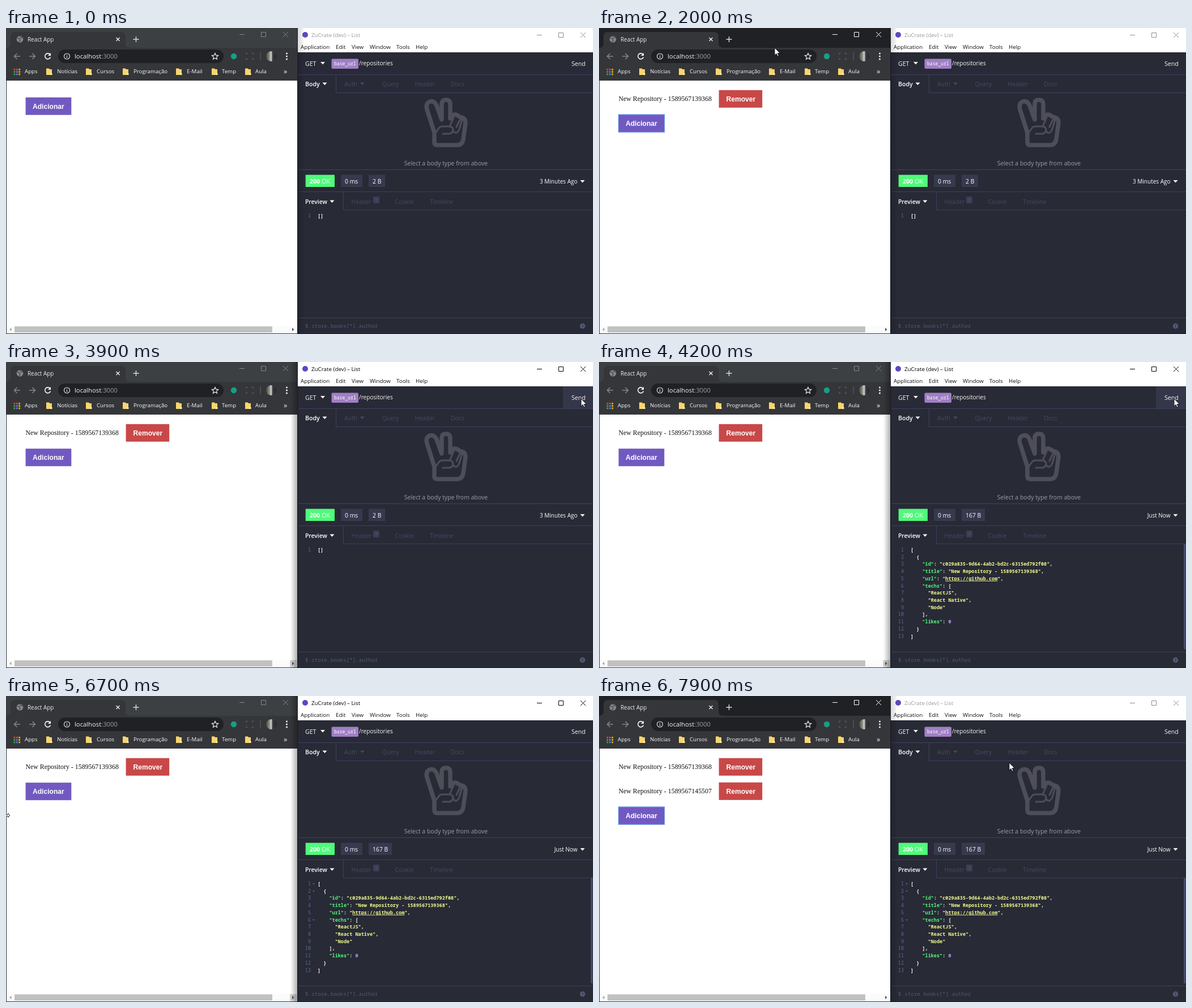
These frames come from a looping animation (1036x541 px, 8000 ms). An HTML page:

```html
<!DOCTYPE html>
<html lang="pt">
<head>
<meta charset="utf-8">
<title>Repositories</title>
<style>
html, body { margin: 0; width: 100%; height: 100%; overflow: hidden; background: #202124; }
svg { display: block; width: 1036px; height: 541px; }
text { white-space: pre; font-family: "Open Sans", "Noto Sans", sans-serif; }
.mono { font-family: "Noto Sans Mono", "DejaVu Sans Mono", monospace; }
.serif { font-family: "Liberation Serif", serif; font-size: 11.87px; fill: #111; }
.btn { font-family: "Liberation Sans", sans-serif; font-size: 12.1px; font-weight: 700; fill: #fff; }
</style>
</head>
<body>
<svg id="stage" viewBox="0 0 1036 541" xmlns="http://www.w3.org/2000/svg"></svg>
<script>
const LOOP = 8000;
const PANEL = '#282a36', EDGE = '#3c4160', FAINT = '#454a66', CHIP = '#373a4e';
const GREEN = '#50fa7b', YELLOW = '#f1fa8c', PURPLE = '#bd93f9', PALE = '#f8f8f2';

const rect = (x, y, w, h, fill, extra = '') =>
  `<rect x="${x}" y="${y}" width="${w}" height="${h}" fill="${fill}" ${extra}/>`;
const text = (x, y, size, fill, str, extra = '') =>
  `<text x="${x}" y="${y}" font-size="${size}" fill="${fill}" ${extra}>${str}</text>`;
const line = (d, color, width = 1, extra = '') =>
  `<path d="${d}" fill="none" stroke="${color}" stroke-width="${width}" ${extra}/>`;
const disc = (x, y, r, fill, extra = '') =>
  `<circle cx="${x}" cy="${y}" r="${r}" fill="${fill}" ${extra}/>`;
const caret = (x, y, fill) => `<path d="M${x - 4} ${y - 2}h8l-4 4.5z" fill="${fill}"/>`;
const group = (id, body) => `<g id="${id}">${body}</g>`;

// Minimise, maximise and close, starting at x
const controls = (x, y) =>
  `<path d="M${x} ${y + .5}h9M${x + 38.5} ${y - 3.5}h8v8h-8zM${x + 77} ${y - 4}l9 9m0 -9l-9 9" fill="none" stroke="currentColor"/>`;

function bookmarks() {
  const names = [[71, 'Notícias'], [141, 'Cursos'], [206, 'Programação'],
    [300, 'E-Mail'], [363, 'Temp'], [422, 'Aula']];
  const hues = ['#ea4335', '#ea4335', '#f9ab00', '#34a853', '#4285f4', '#f9ab00', '#34a853', '#4285f4', '#f9ab00'];
  let out = hues.map((c, i) => rect(13.5 + i % 3 * 4.4, 72 + (i / 3 | 0) * 4.2, 2.8, 2.8, c)).join('');
  out += text(33, 80.2, 9.7, '#f8f9fa', 'Apps');
  for (const [x, name] of names) {
    out += `<path d="M${x} 71.5h5l1 1.5h4v10h-10z" fill="#f8d66d"/>` + rect(x + 7.5, 80, 3, 3, '#fff0b5');
    out += text(x + (x > 350 ? 18 : 19), 80.2, 9.7, '#f8f9fa', name);
  }
  return out + text(490, 81, 13, '#f1f3f4', '»');
}

function browser() {
  const stroke = '#e8eaed', dim = '#85888b';
  return `<rect id="frame" width="514" height="36"/>` +
    rect(0, 35, 514, 58, '#35363a') +
    '<path d="M0 35Q8 35 8 27V15Q8 7 16 7H203Q211 7 211 15V27Q211 35 219 35Z" fill="#35363a"/>' +
    disc(24.5, 20, 5.8, '#85898d') +
    line('M20 18l4 1 1 3 -2 3M25 15l1 2 3 1', '#4a4c50', 1.5) +
    text(38, 24, 9.9, '#e8eaed', 'React App') +
    line('M194.500 17l6 6m0 -6l-6 6', '#f1f3f4', 1.3) +
    line('M224.500 20h10m-5 -5v10', '#dadce0', 1.4) +
    `<g id="leftCtl">${controls(412, 11)}</g>` +
    line('M25 50H14.500m5 -5l-5 5 5 5M41 50h10.500m-5 -5l5 5 -5 5', dim, 1.5) +
    line('M77.500 46.500A5 5 0 1 0 78.500 51.500', '#fff', 1.6) +
    '<path d="M79 44v5h-5z" fill="#fff"/>' +
    rect(92, 38, 292, 24, '#202124', 'rx="12"') +
    disc(107.5, 50, 5, 'none', 'stroke="#dadce0" stroke-width="1.200"') +
    line('M107.500 49.500v3.500m0 -6v1.300', '#dadce0', 1.3) +
    text(121, 53.8, 11.25, '#f1f3f4', 'localhost<tspan fill="#9aa0a6">:3000</tspan>') +
    line('M369 44.500l1.600 3.700 4 .4 -3 2.700 .9 4 -3.500 -2.100 -3.500 2.100 .9 -4 -3 -2.700 4 -.4z', stroke, 1.2) +
    disc(402, 50, 5.2, '#14a085') +
    line('M424 47v-2.500h2.500m7 0h2.500v2.500m0 6v2.500h-2.500m-7 0h-2.500v-2.500', '#5f6266', 1.1) +
    line('M449 43v14', '#5f6368') +
    disc(468, 50, 9, 'url(#photo)') +
    [45, 50, 55].map(y => disc(495.5, y, 1.5, '#f1f3f4')).join('') +
    bookmarks();
}

const repoRow = (id, y, stamp) => group(id,
  `<text class="serif" x="34.500" y="${y + 18.600}">New Repository - ${stamp}</text>` +
  rect(211.6, y - .2, 76.6, 31, '#c84848') +
  `<text class="btn" x="224.500" y="${y + 19.500}">Remover</text>`);

function page() {
  return rect(1, 93, 513, 447, '#fff') +
    repoRow('row1', 110, '1589567139368') + repoRow('row2', 153, '1589567145507') +
    group('add', rect(34.6, -.3, 80.7, 31, '#7159c1') +
      rect(34.5, -.5, 81, 31, 'none', 'id="ring" stroke="#5c8fe6" stroke-width="1.200"') +
      '<text class="btn" x="47" y="19.500">Adicionar</text>') +
    rect(1, 527, 513, 12.5, '#fbfbfb') + rect(15, 527.5, 455, 11, '#c1c1c1') +
    rect(501, 527, 12, 12.5, '#d2d2d2', 'id="scrollHot"') +
    '<path d="M9.500 530v6l-3.500 -3z" fill="#a3a3a3"/><path d="M505 530v6l3.500 -3z" fill="#505050"/>' +
    rect(0, 93, 1, 448, '#303134') + rect(0, 540, 514, 1, '#303134');
}

function peaceHand() {
  const tone = '#4d4e58';
  return line('M756 202V185L743 144Q740 133 748 130Q756 128 760 137L769 162V135Q769 127 776.500 127Q784 127 784 135V160' +
      'L787 156Q792 150 799 156L803 158Q811 159 811 168L807 197Q805 207 796 207H762Q756 207 756 202Z', tone, 7.5, 'stroke-linejoin="round"') +
    line('M757 187L764 177Q766 174 770 174H783Q789 175 789 180Q788 187 782 187H771M784 172L790 158' +
      'M789 182Q795 190 800 179L805 162M795 175L803 158', tone, 3, 'stroke-linecap="round"');
}

function jsonView() {
  const rows = ['[', '  {', '    "id": "c029a835-9d64-4ab2-bd2c-6315ed792f08",',
    '    "title": "New Repository - 1589567139368",', '    "url": "https://github.com",',
    '    "techs": [', '      "ReactJS",', '      "React Native",', '      "Node"',
    '    ],', '    "likes": 0', '  }', ']'];
  const span = (fill, str, extra = '') => `<tspan fill="${fill}" ${extra}>${str}</tspan>`;
  const paint = str => str.replace(/"([^"]*)"(:?)|\b0\b/g, (all, body, colon) => {
    if (body === undefined) return span(PURPLE, all);
    if (colon) return span(GREEN, `"${body}"`) + ':';
    if (body.startsWith('http')) return span(YELLOW, '"' + span(YELLOW, body, 'text-decoration="underline"') + '"');
    return span(YELLOW, `"${body}"`);
  });
  return rows.map((str, i) => {
    const y = 335 + i * 12.71;
    return text(538, y, 8.5, '#5b6994', i + 1, 'class="mono" text-anchor="end"') +
      text(550, y, 8.53, PALE, paint(str), 'class="mono" font-weight="600"');
  }).join('') + rect(1032, 322, 3.5, 186, '#434d6c');
}

function client() {
  const tabs = (y, items) => items.map(([x, s]) => text(x, y, 10.4, FAINT, s)).join('');
  const menu = [[520, 'Application'], [582, 'Edit'], [610, 'View'], [642, 'Window'], [689, 'Tools'], [723, 'Help']];
  const folds = [332, 345, 396].map(y => `<path d="M541 ${y - 1}h4l-2 2.500z" fill="#5b6385"/>`).join('');
  return rect(514, 0, 522, 541, '#1f212b') + rect(515, 0, 521, 43, '#fff') +
    disc(528, 12, 5, '#5849be') +
    `<text id="title" x="539" y="16" font-size="9.800">ZuCrate (dev) – List</text>` +
    `<g id="rightCtl">${controls(937, 12)}</g>` +
    menu.map(([x, s]) => text(x, 37, 9.8, '#111', s)).join('') +
    rect(516, 43, 520, 497, PANEL) +
    rect(983, 43, 53, 39, '#34374a', 'id="hover"') +
    line('M516 82.500H1036M582.500 83V114.500H1036M516 250.500H1036M516 289.500H1036M595.500 290V321.500H1036M516 512.500H1036', EDGE) +
    text(528, 66.5, 10.6, PALE, 'GET') + caret(559, 62, PALE) +
    rect(574.5, 54.5, 47.5, 17.5, '#a07fc6', 'rx="2"') +
    text(579, 66, 8.1, '#fff', 'base_url', 'class="mono"') +
    text(623, 66.3, 10.1, PALE, '/repositories') + text(998, 66.8, 10.6, PALE, 'Send') +
    text(528, 102.5, 10.6, '#fff', 'Body', 'font-weight="600"') + caret(562.5, 98.5, '#fff') +
    tabs(102.5, [[597, 'Auth'], [663.5, 'Query'], [721.5, 'Header'], [785, 'Docs']]) + caret(629, 98.5, FAINT) +
    peaceHand() +
    text(776.5, 243, 10.5, '#9d9ea5', 'Select a body type from above', 'text-anchor="middle"') +
    rect(528.7, 259.6, 51.3, 21.4, GREEN) +
    text(536, 275, 10.6, '#fff', '<tspan font-weight="700">200</tspan> OK') +
    rect(591, 259.6, 38, 21.4, CHIP) + text(598, 275, 10.4, '#fff', '0 ms') +
    `<rect id="sizeChip" x="640" y="259.600" height="21.400" fill="${CHIP}"/>` +
    `<text id="size" x="647" y="275" font-size="10.400" fill="#fff"></text>` +
    `<text id="age" x="1008.500" y="274.500" font-size="10" fill="#fff" text-anchor="end"></text>` + caret(1017.5, 271, PALE) +
    text(528, 310.5, 10.3, '#fff', 'Preview', 'font-weight="600"') + caret(575.5, 306.5, '#fff') +
    tabs(310.5, [[609.5, 'Header'], [686.5, 'Cookie'], [748, 'Timeline']]) +
    rect(648, 298, 11, 12, '#3b3e55', 'rx="2"') + text(651.5, 306.5, 7.5, '#5a607f', '7') +
    group('empty', text(538, 335, 8.5, '#5b6994', '1', 'class="mono" text-anchor="end"') +
      text(550, 335, 8.53, PALE, '[]', 'class="mono" font-weight="600"')) +
    group('json', jsonView()) + group('folds', folds) +
    text(528, 530, 9.3, '#525977', '$.store.books[*].author', 'class="mono"') +
    disc(1017.5, 527, 4.7, '#555a75') + text(1017.5, 530, 7.5, PANEL, '?', 'text-anchor="middle" font-weight="700"');
}

// The window in front darkens the edge of its neighbour
function shadows() {
  return rect(502, 0, 12, 541, 'url(#shadeRight)', 'id="overLeft"') +
    rect(515, 0, 10, 541, 'url(#shadeLeft)', 'id="overRight"');
}

function pointers() {
  const ink = 'fill="#fff" stroke="#111" stroke-width=".9" stroke-linejoin="round"';
  return group('arrow', `<path d="M0 0V13.200L3.100 10.400L5.200 15L7.200 14.100L5.200 9.600H9.400Z" ${ink}/>`) +
    group('hand', `<path d="M-1.500 2Q0 -1.500 1.700 2V7Q3.500 5.500 4.500 7.600Q6.500 6.500 7.200 8.600Q9.600 8 9.300 11V14.500L7.500 19.500H-.5L-4.500 13Q-6 10.500 -4.500 9.700Q-3 9.500 -1.500 12Z" ${ink}/>`) +
    group('ibeam', line('M-2.500 -6.500H2.500M0 -6.500V6.500M-2.500 6.500H2.500', '#f5f5f5', 1.2)) +
    group('resize', `<path d="M-6 0L-2.500 -3.500V-1.300H1.500V-3.500L5 0L1.500 3.500V1.300H-2.500V3.500Z" ${ink}/>`);
}

const fade = (id, stops) => `<linearGradient id="${id}">` +
  stops.map(([at, color, alpha = 1]) => `<stop offset="${at}" stop-color="${color}" stop-opacity="${alpha}"/>`).join('') +
  '</linearGradient>';

const stage = document.getElementById('stage');
stage.innerHTML = '<defs>' +
  fade('photo', [[0, '#3f4a3c'], [.35, '#8f978c'], [.5, '#d5d7d2'], [.65, '#3a3d3c'], [1, '#22262a']]) +
  fade('shadeRight', [[0, '#000', 0], [1, '#000', .3]]) +
  fade('shadeLeft', [[0, '#000', .14], [1, '#000', .04]]) + '</defs>' +
  client() + browser() + page() + shadows() + pointers();

const el = {};
stage.querySelectorAll('[id]').forEach(node => { el[node.id] = node; });
const show = (id, on) => el[id].setAttribute('display', on ? 'inline' : 'none');

// Pointer path: time, x, y, shape
const PATH = [
  [600, 635, 14, 'arrow'], [700, 58, 178, 'arrow'], [800, 101, 143, 'hand'], [900, 101, 143, 'hand'],
  [1000, 101, 142, 'hand'], [1600, 101, 142, 'hand'], [1700, 60, 184, 'arrow'], [1900, 200, 60, 'arrow'],
  [2100, 420, 10, 'arrow'], [2300, 625, 60, 'arrow'], [2500, 607, 118, 'arrow'], [2600, 650, 118, 'arrow'],
  [2800, 760, 75, 'ibeam'], [2900, 809, 60, 'ibeam'], [3200, 985, 60, 'arrow'], [3300, 985, 60, 'arrow'],
  [3400, 1000, 62, 'arrow'], [3700, 1015, 65, 'arrow'], [4600, 1015, 65, 'arrow'], [4700, 1005, 90, 'arrow'],
  [4900, 960, 240, 'ibeam'], [5100, 876, 376, 'ibeam'], [5400, 689, 396, 'ibeam'], [5600, 689, 396, 'ibeam'],
  [5700, 685, 402, 'ibeam'], [5900, 676, 417, 'ibeam'], [6300, 676, 417, 'ibeam'], [6400, 600, 414, 'ibeam'],
  [6500, 380, 360, 'arrow'], [6700, 2, 211, 'resize'], [6800, 20, 90, 'arrow'], [6900, 60, 11, 'arrow'],
  [7000, 110, 90, 'arrow'], [7200, 99, 165, 'hand'], [7600, 99, 165, 'hand'], [7700, 99, 203, 'hand'],
  [7800, 420, 150, 'arrow'], [7900, 724, 118, 'arrow']
];

function pointerAt(t) {
  const i = PATH.findLastIndex(k => k[0] <= t);
  if (i < 0) return null;
  const a = PATH[i], b = PATH[i + 1] || a;
  const p = b === a ? 0 : (t - a[0]) / (b[0] - a[0]);
  return { x: a[1] + (b[1] - a[1]) * p, y: a[2] + (b[2] - a[2]) * p, shape: a[3] };
}

function render(time) {
  const t = Math.floor(time % LOOP / 100) * 100;
  const left = t >= 1300 && t < 3900 || t >= 7300;
  const right = t >= 3900 && t < 7300;
  const rows = t >= 7400 ? 2 : t >= 1400 ? 1 : 0;
  const loaded = t >= 4100;

  el.frame.setAttribute('fill', left ? '#202124' : '#3c4043');
  el.leftCtl.setAttribute('color', left ? '#fff' : '#85888b');
  el.rightCtl.setAttribute('color', right ? '#000' : '#8c8c8c');
  el.title.setAttribute('fill', right ? '#000' : '#999');
  show('overLeft', right);
  show('overRight', !right);
  show('scrollHot', right);
  show('ring', left);
  show('row1', rows > 0);
  show('row2', rows > 1);
  el.add.setAttribute('transform', `translate(0 ${[123, 153.5, 196.5][rows]})`);

  show('hover', t >= 3400 && t < 4700);
  show('empty', !loaded);
  show('json', loaded);
  show('folds', t >= 4500);
  el.sizeChip.setAttribute('width', loaded ? 41 : 29);
  el.size.textContent = loaded ? '167 B' : '2 B';
  el.age.textContent = loaded ? 'Just Now' : '3 Minutes Ago';

  const pointer = pointerAt(t);
  for (const shape of ['arrow', 'hand', 'ibeam', 'resize']) show(shape, pointer?.shape === shape);
  if (pointer) el[pointer.shape].setAttribute('transform', `translate(${pointer.x} ${pointer.y})`);
}

const start = performance.now();
function tick() {
  render(performance.now() - start);
  requestAnimationFrame(tick);
}
tick();
</script>
</body>
</html>
```
